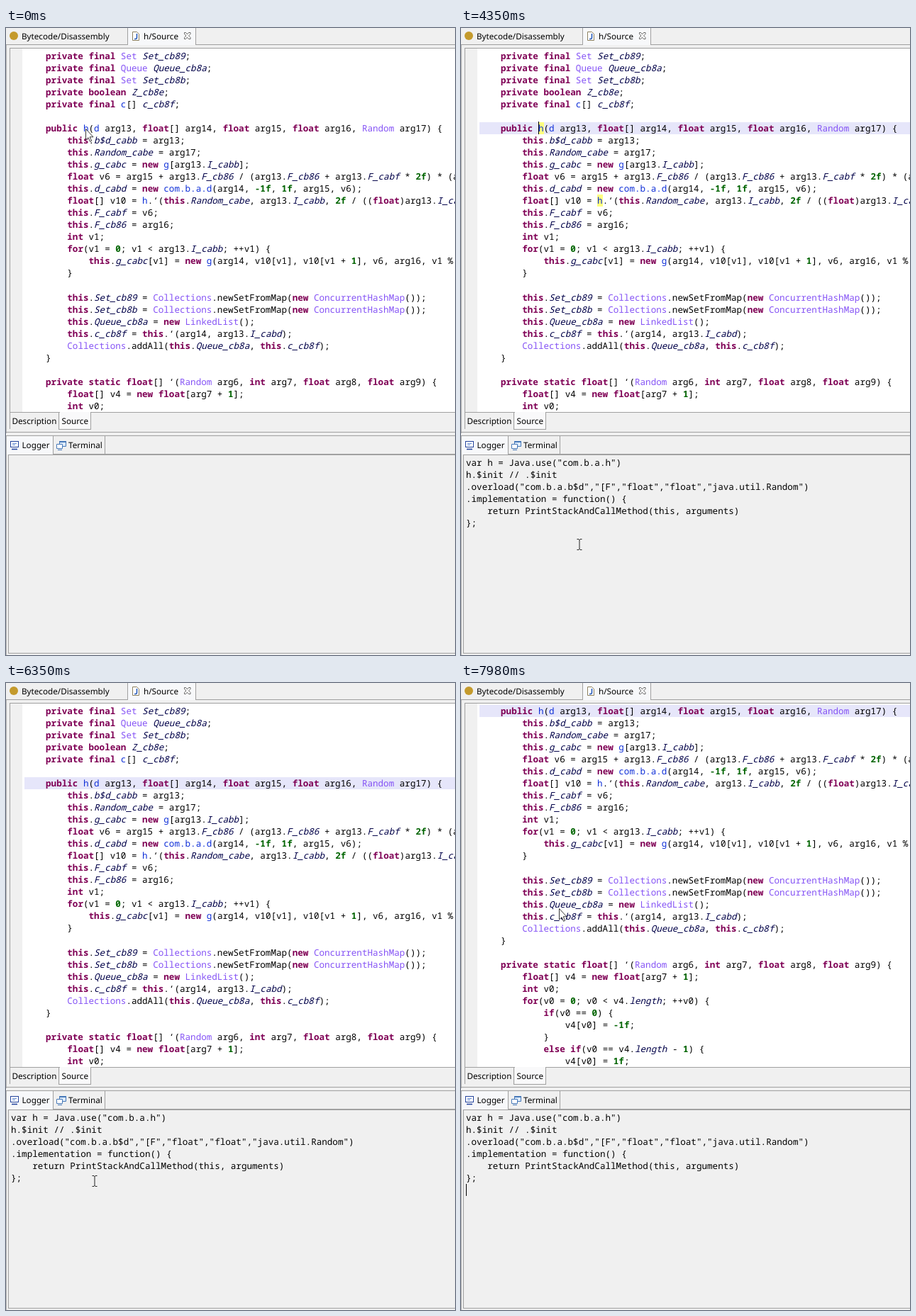
An HTML page for the animation above (8000 ms loop, 633 by 885 pixels).

```html
<!DOCTYPE html>
<html lang="en">
<head>
<meta charset="utf-8">
<title>Code editor and logger</title>
<style>
  html, body { margin: 0; width: 100%; height: 100%; overflow: hidden; background: #f0f0f0; }
  svg { display: block; width: 633px; height: 885px; }
  rect { shape-rendering: crispEdges; }
  text { white-space: pre; text-rendering: geometricPrecision; }
  .mono { font: 12.6px "Noto Sans Mono", "DejaVu Sans Mono", monospace; font-variant-ligatures: none; fill: #000; }
  .ui { font: 11.7px "Noto Sans", "Open Sans", sans-serif; fill: #000; }
  .key { font-weight: bold; fill: #7f0055; }
  .num { font-weight: bold; fill: #006400; }
  .type { fill: #8553f5; }
  .name { fill: #1030d8; }
  .field { font-style: italic; fill: #000048; }
</style>
</head>
<body>
<svg id="stage" viewBox="0 0 633 885"></svg>
<script>
const LOOP = 8000, CHAR = 7.56, ROW = 17.05, TOP = 30.5, LOG_ROW = 17, LOG_TOP = 605;

const code = `
    private final Set Set_cb89;
    private final Queue Queue_cb8a;
    private final Set Set_cb8b;
    private boolean Z_cb8e;
    private final c[] c_cb8f;

    public h(d arg13, float[] arg14, float arg15, float arg16, Random arg17) {
        this.b$d_cabb = arg13;
        this.Random_cabe = arg17;
        this.g_cabc = new g[arg13.I_cabb];
        float v6 = arg15 + arg13.F_cb86 / (arg13.F_cb86 + arg13.F_cabf * 2f) * (arg16
        this.d_cabd = new com.b.a.d(arg14, -1f, 1f, arg15, v6);
        float[] v10 = h.‘(this.Random_cabe, arg13.I_cabb, 2f / ((float)arg13.I_cabb));
        this.F_cabf = v6;
        this.F_cb86 = arg16;
        int v1;
        for(v1 = 0; v1 < arg13.I_cabb; ++v1) {
            this.g_cabc[v1] = new g(arg14, v10[v1], v10[v1 + 1], v6, arg16, v1 % 2);
        }

        this.Set_cb89 = Collections.newSetFromMap(new ConcurrentHashMap());
        this.Set_cb8b = Collections.newSetFromMap(new ConcurrentHashMap());
        this.Queue_cb8a = new LinkedList();
        this.c_cb8f = this.‘(arg14, arg13.I_cabd);
        Collections.addAll(this.Queue_cb8a, this.c_cb8f);
    }

    private static float[] ‘(Random arg6, int arg7, float arg8, float arg9) {
        float[] v4 = new float[arg7 + 1];
        int v0;
        for(v0 = 0; v0 < v4.length; ++v0) {
            if(v0 == 0) {
                v4[v0] = -1f;
            }
            else if(v0 == v4.length - 1) {
                v4[v0] = 1f;`.split("\n").slice(1);

const log = `var h = Java.use("com.b.a.h")
h.$init // .$init
.overload("com.b.a.b$d","[F","float","float","java.util.Random")
.implementation = function() {
    return PrintStackAndCallMethod(this, arguments)
};`.split("\n");

const styles = [
  ["key", /^(private|final|boolean|public|float|this|new|int|for|static|if|else)$/],
  ["type", /^(Set|Queue|Random|Collections|ConcurrentHashMap|LinkedList)$/],
  ["num", /^-?\d+f?$/],
  ["name", /^([cdgh]|com\.b\.a\.d)$/],
  ["field", /^([\w$]+_c\w{3}|length)$/]
];

const escapeText = s => s.replace(/&/g, "&amp;").replace(/</g, "&lt;");
const rect = (x, y, w, h, fill, extra = "") =>
  `<rect x="${x}" y="${y}" width="${w}" height="${h}" fill="${fill}" ${extra}/>`;
const label = (x, y, s) => `<text class="ui" x="${x}" y="${y}">${s}</text>`;
const hline = (x, y, w, color = "#a0a0a0") => rect(x, y, w, 1, color);
const vline = (x, y, h, color = "#a0a0a0") => rect(x, y, 1, h, color);

function textLine(line, x, y, paint) {
  const indent = line.search(/\S|$/);
  return `<text class="mono" x="${x + indent * CHAR}" y="${y}">${paint(line.slice(indent))}</text>`;
}

function highlight(line) {
  const tokens = line.match(/com\.b\.a\.d|-?\b\d+f?\b|[\w$]+|[^\w$]/g) || [];
  return tokens.map(token => {
    const style = styles.find(([, pattern]) => pattern.test(token));
    return style ? `<tspan class="${style[0]}">${token}</tspan>` : escapeText(token);
  }).join("");
}

const codeText = code.map((l, i) => textLine(l, 25.8, TOP + 13 + i * ROW, highlight)).join("");
const logText = log.map((l, i) => textLine(l, 7, LOG_TOP + 13 + i * LOG_ROW, escapeText)).join("");
const selection = log.map((l, i) =>
  `<g class="picked">${rect(7, LOG_TOP + i * LOG_ROW, Math.round(l.length * CHAR + 6), LOG_ROW, "#0078d7")}
  <g style="--ink:#fff">${textLine(l, 7, LOG_TOP + 13 + i * LOG_ROW, escapeText).replace("<text", '<text style="fill:#fff"')}</g></g>`).join("");

const topTabs = rect(172, 0, 95, 24, "#f7f8fa") + hline(0, 23, 172) + hline(267, 23, 366) +
  vline(171, 0, 24) + vline(267, 0, 24) +
  `<circle cx="11" cy="11" r="6" fill="#c49a2c"/>` + label(22, 15.5, "Bytecode/Disassembly") +
  `<path d="M178.5 5.5h6l3 3v9h-9z" fill="#fff" stroke="#8c8060"/>
   <path d="M184.500 8v5.500q0 2-2 2h-1.500" fill="none" stroke="#2458b8" stroke-width="1.6"/>` +
  label(194, 15.5, "h/Source") +
  `<path d="M251.500 6.500h2l2 2.500 2-2.500h2.500v2l-2.500 2.500 2.500 2.500v2h-2.500l-2-2.500-2 2.500h-2v-2l2.500-2.500-2.500-2.500z" fill="#fff" stroke="#666"/>`;

const sourceTabs = rect(76, 542, 43, 25, "#f9f9fa") + hline(5, 542, 71) + hline(119, 542, 514) +
  vline(74, 543, 24) + vline(119, 543, 24) + hline(75, 566, 45) +
  label(8.5, 559, "Description") + label(78.5, 559, "Source");

const logTabs = hline(0, 570, 633) + hline(0, 575, 633) + rect(0, 576, 66, 26, "#f7f8fa") +
  vline(66, 576, 26) + vline(139, 576, 25) + hline(66, 601, 567) +
  `<rect x="6.500" y="583.500" width="11" height="8" rx="1" fill="#fff" stroke="#23439b" stroke-width="1.6"/>
   <path d="M9 586.500h6M9 588.500h4" stroke="#5f87cf"/><path d="M8 594.500h8" stroke="#23439b" stroke-width="1.6"/>
   <path d="M75.500 583.500h9v7h-9z" fill="#dcebfb" stroke="#4678b8"/><path d="M75 584h10" stroke="#4678b8" stroke-width="2"/>
   <path d="M71.500 587.500h8v6h-8z" fill="#fff" stroke="#4678b8"/><path d="M73 595.500h6" stroke="#4678b8"/>` +
  label(22.5, 593, "Logger") + label(88, 593, "Terminal");

const stage = document.getElementById("stage");
stage.innerHTML = `
  <clipPath id="view"><rect x="6" y="29" width="627" height="512"/></clipPath>
  ${rect(0, 0, 633, 885, "#f0f0f0")}
  ${topTabs}
  ${vline(0, 24, 548, "#b4b4b4")}
  ${rect(23, 29, 610, 513, "#fff")}
  ${hline(5, 28, 628)}${vline(5, 28, 538)}
  <g clip-path="url(#view)"><g id="page">
    ${rect(26, 133, 607, 17, "#e6e6fa", 'id="activeRow"')}
    <g id="matches">${rect(109, 133, 8, 17, "#ffff80")}${rect(192, 235, 8, 17, "#ffff80")}</g>
    ${codeText}
    ${rect(109, 132, 1, 18, "#000", 'id="codeCaret"')}
  </g></g>
  ${sourceTabs}${logTabs}
  ${rect(3, 602, 630, 281, "#f0f0f0")}
  ${hline(3, 602, 630)}${vline(3, 602, 281)}${hline(3, 882, 630)}${vline(0, 576, 309, "#b4b4b4")}
  <g id="log">${logText}${selection}</g>
  ${rect(7, 707, 1, 17, "#000", 'id="logCaret"')}
  <g id="mouse">
    <circle id="halo" r="9.500" fill="#ffe600" fill-opacity=".6"/>
    <path id="arrow" d="M.5.5V16l3.500-3.300 2.500 5.600 2.200-1-2.500-5.500H11z" fill="#fff" stroke="#222" stroke-width=".9"/>
    <path id="beam" d="M-3.500-7.500h2.500l1 1 1-1h2.500M0-7V7M-3.500 7.500h2.500l1-1 1 1h2.500" fill="none" stroke="#222"/>
  </g>`;

const el = id => document.getElementById(id);
const [page, activeRow, matches, codeCaret, logCaret, logView, mouse, halo, arrow, beam] =
  ["page", "activeRow", "matches", "codeCaret", "logCaret", "log", "mouse", "halo", "arrow", "beam"].map(el);
const picked = [...document.querySelectorAll(".picked")];

const show = (node, visible) => node.setAttribute("visibility", visible ? "visible" : "hidden");
const during = (t, ...spans) => spans.some(([from, to]) => t >= from && t < to);

// Pointer path: time, x, y
const path = [
  [3820, 112, 142], [4040, 160, 470], [4195, 192, 720], [4275, 184, 757], [4349, 167, 729],
  [4650, 14, 723], [4730, 10, 721], [4959, 6, 631], [5035, 5, 613], [5260, 5, 613],
  [5490, 138, 718], [5570, 148, 742], [5800, 148, 742], [6334, 125, 703], [6487, 128, 673],
  [6790, 128, 673], [7550, 145, 318]
];

function pointer(t) {
  if (t >= 7980) return [138, 318];
  const step = 76.4, sampled = 3890 + Math.floor((t - 3890) / step) * step;
  const next = path.findIndex(p => p[0] > sampled);
  if (next === 0) return path[0].slice(1);
  if (next < 0) return path[path.length - 1].slice(1);
  const [a, b] = [path[next - 1], path[next]];
  const k = (sampled - a[0]) / (b[0] - a[0]);
  return [1, 2].map(i => Math.round(a[i] + (b[i] - a[i]) * k));
}

function render(t) {
  const [x, y] = pointer(t);
  const scrolled = t < 7680 ? 0 : t < 7750 ? 3 : 6;
  page.setAttribute("transform", `translate(0 ${-scrolled * 17})`);
  show(activeRow, t >= 630);
  show(matches, during(t, [1880, 4660]));
  show(codeCaret, during(t, [720, 1180], [1730, 1880], [2960, 3430], [3965, 4500]));
  show(logCaret, during(t, [4660, 4730], [5660, 6120], [6670, 7200], [7750, LOOP]));
  logView.style.display = t >= 3040 ? "" : "none";

  const dragRow = t < 5035 ? Math.floor((y - LOG_TOP) / LOG_ROW) : 0;
  const selecting = during(t, [4730, 5620]);
  picked.forEach((row, i) => { row.style.display = selecting && i >= dragRow ? "" : "none"; });

  const overLog = y > 602;
  mouse.setAttribute("transform", `translate(${x} ${y})`);
  show(arrow, !overLog);
  show(beam, overLog);
  show(halo, during(t, [630, 720], [4660, 5190], [5580, 5660]));
}

const start = performance.now();
function tick() {
  render((performance.now() - start) % LOOP);
  requestAnimationFrame(tick);
}
tick();
</script>
</body>
</html>
```
